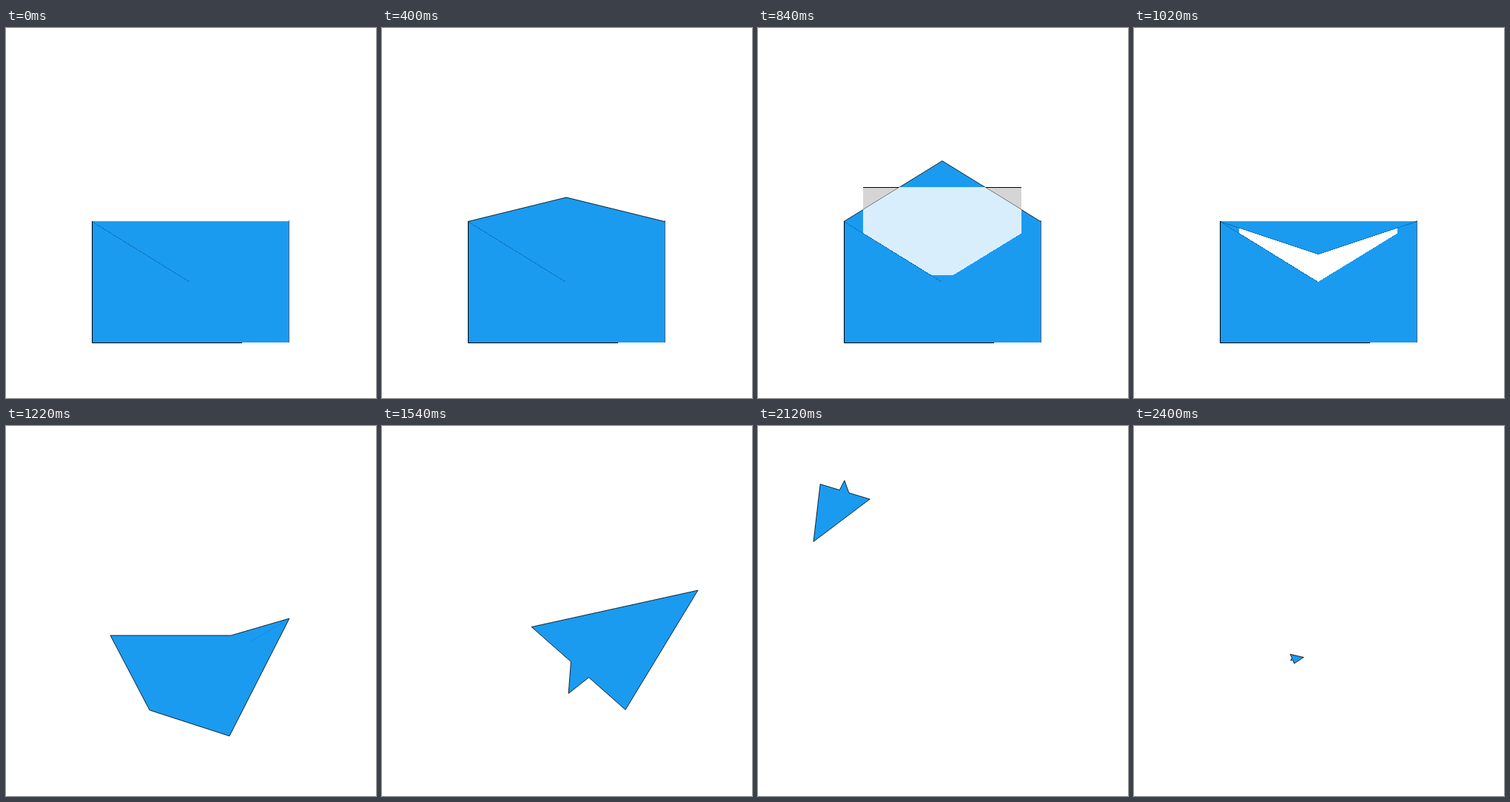
Recreate the animation shown at these times as an HTML page. Size 500 by 500 pixels, loop 2420 ms.

```html
<!DOCTYPE html>
<html lang="en">
<head>
<meta charset="utf-8">
<title>Envelope to paper plane</title>
<style>
html, body { margin: 0; width: 100%; height: 100%; overflow: hidden; background: #fff; }
svg { display: block; width: 100%; height: 100%; }
.blue { fill: #1a9bf0; }
.line { fill: none; stroke: #000; }
.fold { fill: none; stroke: #1277bd; }
.edge { stroke: #000; stroke-width: .8; stroke-linejoin: bevel; }
</style>
</head>
<body>
<svg viewBox="0 0 500 500" shape-rendering="crispEdges">
  <defs>
    <clipPath id="cover"><path id="coverShape"/></clipPath>
  </defs>
  <g id="mail">
    <g id="sheet">
      <rect id="paper" x="142" width="214" height="118.5"/>
      <path class="line" d="M142 .5H356"/>
    </g>
    <path id="flapUp" class="blue edge"/>
    <path class="blue" d="M116 261.5H382V425H116Z"/>
    <g id="inside">
      <g clip-path="url(#cover)">
        <rect id="tint" x="142" width="214" height="118.5" fill="#fff"/>
      </g>
      <path class="blue" d="M116 261.500L249 343L382 261.500V425H116Z"/>
    </g>
    <path id="flapDown" class="blue"/>
    <path id="flapEdge" class="fold"/>
    <path class="fold" d="M116 261.500L248 343"/>
    <path id="rim" class="line" stroke-opacity=".45" d="M116 261.500H382"/>
    <path class="line" d="M116.500 261V425.500H319"/>
    <path class="line" stroke-opacity=".6" d="M382.500 260V425"/>
  </g>
  <g id="plane">
    <path id="body" class="blue edge"/>
    <path id="crease" class="fold"/>
  </g>
</svg>
<script>
const LOOP = 2420, STEP = 20;
const OPEN = [60, 600], DROP = [640, 920], FADE = [640, 880], CLOSE = [880, 1085];
const FOLD = 1085, HALF = 1220, FLY = 1540, END = 2400;

const $ = id => document.getElementById(id);
const set = (id, name, value) => $(id).setAttribute(name, value);
const show = (id, on) => set(id, "display", on ? "inline" : "none");
const part = (t, [a, b]) => Math.min(1, Math.max(0, (t - a) / (b - a)));
const swing = p => (1 - Math.cos(Math.PI * p)) / 2;
const lerp = (a, b, p) => a.map((v, i) => v + (b[i] - v) * p);
const mix = (a, b, p) => a.map((pt, i) => lerp(pt, b[i], p));
const outline = pts => "M" + pts.map(p => p.map(v => v.toFixed(2)).join(" ")).join("L") + "Z";

// flat paper: the tail is a corner, so the notches are still hidden on its edges
const flat = (wing, nose, wing2, tail, bend) =>
  [wing, bend, nose, wing2, lerp(wing2, tail, .5), tail, lerp(tail, wing, .5)];
// finished plane: the tail sticks out of the base between the wings
const dart = (wing, nose, wing2, tail) =>
  [wing, lerp(wing, nose, .5), nose, wing2, lerp(wing, wing2, .61), tail, lerp(wing, wing2, .42)];

const sheetPose = flat([116, 261], [382, 261], [382, 425], [116, 425], [249, 261]);
const halfPose = flat([141, 283], [383, 260], [302, 419], [194, 384], [304, 283]);
const planePose = dart([202, 271.5], [427, 222], [329, 383.5], [252, 361.5]);
const pivot = [0, 1].map(k => (planePose[0][k] + planePose[2][k] + planePose[3][k]) / 3);

// centre of the plane at equal steps of time
const route = [pivot, [377, 236], [377, 116], [168, 78], [46, 198], [219, 314]];

// Catmull-Rom curve through the route
function position(t) {
  const last = route.length - 1, s = part(t, [FLY, END]) * last;
  const i = Math.min(last - 1, Math.floor(s)), u = s - i;
  const [a, b, c, d] = [-1, 0, 1, 2].map(j => route[Math.min(last, Math.max(0, i + j))]);
  return b.map((v, k) => v + u / 2 * (c[k] - a[k]
    + u * (2 * a[k] - 5 * v + 4 * c[k] - d[k] + u * (3 * v - a[k] - 3 * c[k] + d[k]))));
}

function flyingPose(t) {
  const [x, y] = position(t);
  const scale = 1 - Math.max(0, t - 1628) / 840;
  const turn = -.465 * Math.max(0, t - 1680) * Math.PI / 180;
  const c = Math.cos(turn) * scale, n = Math.sin(turn) * scale;
  return planePose.map(([px, py]) => {
    const dx = px - pivot[0], dy = py - pivot[1];
    return [x + dx * c - dy * n, y + dx * n + dy * c];
  });
}

function drawMail(t) {
  const lift = part(t, OPEN) - part(t, CLOSE);
  const tip = 343 - 163.5 * swing(lift);
  const up = tip < 261, flap = `M116 261.5L249 ${tip}L382 261.5`;
  show("flapUp", up);
  show("flapDown", !up);
  show("flapEdge", !up && tip < 341);
  show("rim", !up);
  for (const id of ["flapUp", "flapDown", "flapEdge"]) set(id, "d", flap);
  set("coverShape", "d", up ? flap + "V425H116Z" : "M116 261.5H382V425H116Z");

  const letter = t > DROP[0];
  show("sheet", letter);
  show("inside", letter);
  const y = 13 + 249 * swing(part(t, DROP)), alpha = part(t, FADE);
  const tone = Math.round(255 * alpha);
  set("sheet", "transform", `translate(0 ${Math.round(y)})`);
  set("paper", "fill", `rgb(${tone},${tone},${tone})`);
  set("tint", "y", Math.round(y));
  set("tint", "fill-opacity", alpha);
}

function drawPlane(t) {
  const pose = t >= FLY ? flyingPose(t)
    : t < HALF ? mix(sheetPose, halfPose, part(t, [FOLD, HALF]))
    : mix(halfPose, planePose, part(t, [HALF, FLY]));
  set("body", "d", outline(pose));
  const [x, y] = pose[2];
  set("crease", "d", `M${x} ${y}l-53 32`);
  set("crease", "stroke-opacity", .35 * Math.max(0, 1 - Math.abs(t - HALF) / 100));
}

function draw(time) {
  const t = Math.floor(time % LOOP / STEP) * STEP;
  const mail = t < FOLD;
  show("mail", mail);
  show("plane", !mail);
  if (mail) drawMail(t); else drawPlane(t);
}

const start = performance.now();
function tick(now) {
  draw(Math.max(0, now - start));
  requestAnimationFrame(tick);
}
draw(0);
requestAnimationFrame(tick);
</script>
</body>
</html>
```
